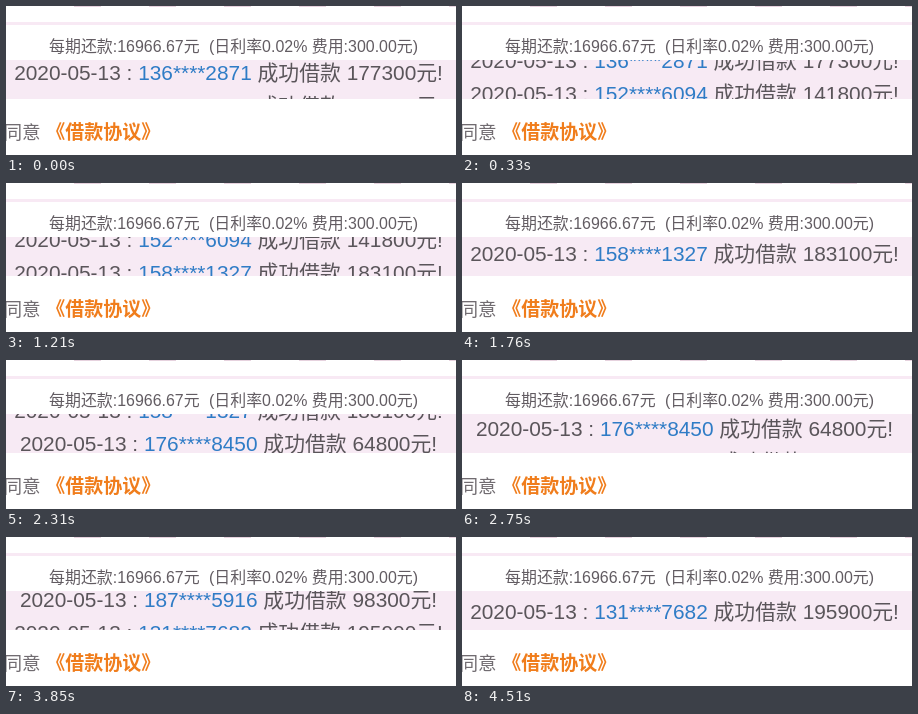
Write an HTML page that moves like this. It is 450x149 px and loops after 4.62 s.

```html
<!DOCTYPE html>
<html lang="zh-CN">
<head>
<meta charset="utf-8">
<style>
  html, body { margin: 0; width: 100%; height: 100%; overflow: hidden; background: #fff; }
  svg { display: block; width: 450px; height: 149px; }
  text { font-family: "Liberation Sans", "Noto Sans CJK SC", "Noto Sans CJK", "Noto Sans CJK JP", sans-serif; white-space: pre; }
  .fee { font-size: 15.95px; fill: #625c62; }
  .row { font-size: 20.85px; fill: #5a555a; text-anchor: middle; }
  .row tspan { fill: #2f7cc6; }
  .agree { font-size: 18.6px; fill: #716c71; }
  .link { font-size: 19px; font-weight: bold; fill: #f07d1c; }
</style>
</head>
<body>
<svg viewBox="0 0 450 149">
  <clipPath id="band"><rect y="54" width="450" height="39"/></clipPath>
  <path d="M68 .5H450" stroke="#e6d2de" stroke-dasharray="27 48"/>
  <rect y="16" width="450" height="3" fill="#f8e9f4"/>
  <text class="fee" x="43" y="45.5">每期还款:16966.67元</text>
  <text class="fee" x="203" y="45.5">(日利率0.02% 费用:300.00元)</text>
  <rect y="54" width="450" height="39" fill="#f7eaf4"/>
  <g clip-path="url(#band)"><g id="list"></g></g>
  <text class="agree" x="-2.5" y="132.5">同意</text>
  <text class="link" x="40.3" y="133">《借款协议》</text>
</svg>
<script>
const LOOP = 4620, TICK = 110, STEP = 935, LEAD = 165, GAP = 33;
const loans = [
  ["136****2871", 177300],
  ["152****6094", 141800],
  ["158****1327", 183100],
  ["176****8450", 64800],
  ["187****5916", 98300],
  ["131****7682", 195900]
];
const list = document.getElementById("list");
list.innerHTML = loans.map(([phone, sum], i) =>
  `<text class="row" x="222.5" y="${82 + i * GAP}">2020-05-13 : <tspan>${phone}</tspan> 成功借款 ${sum}元!</text>`
).join("");

// Each row rests briefly, then glides up by one row height.
function scrollAt(t) {
  const u = t + LEAD, phase = u % STEP;
  const shift = phase < 20 ? 0 : Math.min(GAP, 2.5 + 0.0353 * phase);
  return Math.floor(u / STEP) * GAP + Math.round(shift);
}

function draw(now) {
  const t = Math.floor((now % LOOP) / TICK) * TICK;
  list.setAttribute("transform", `translate(0 ${-scrollAt(t)})`);
}

const start = performance.now();
function frame() {
  draw(performance.now() - start);
  requestAnimationFrame(frame);
}
frame();
</script>
</body>
</html>
```
